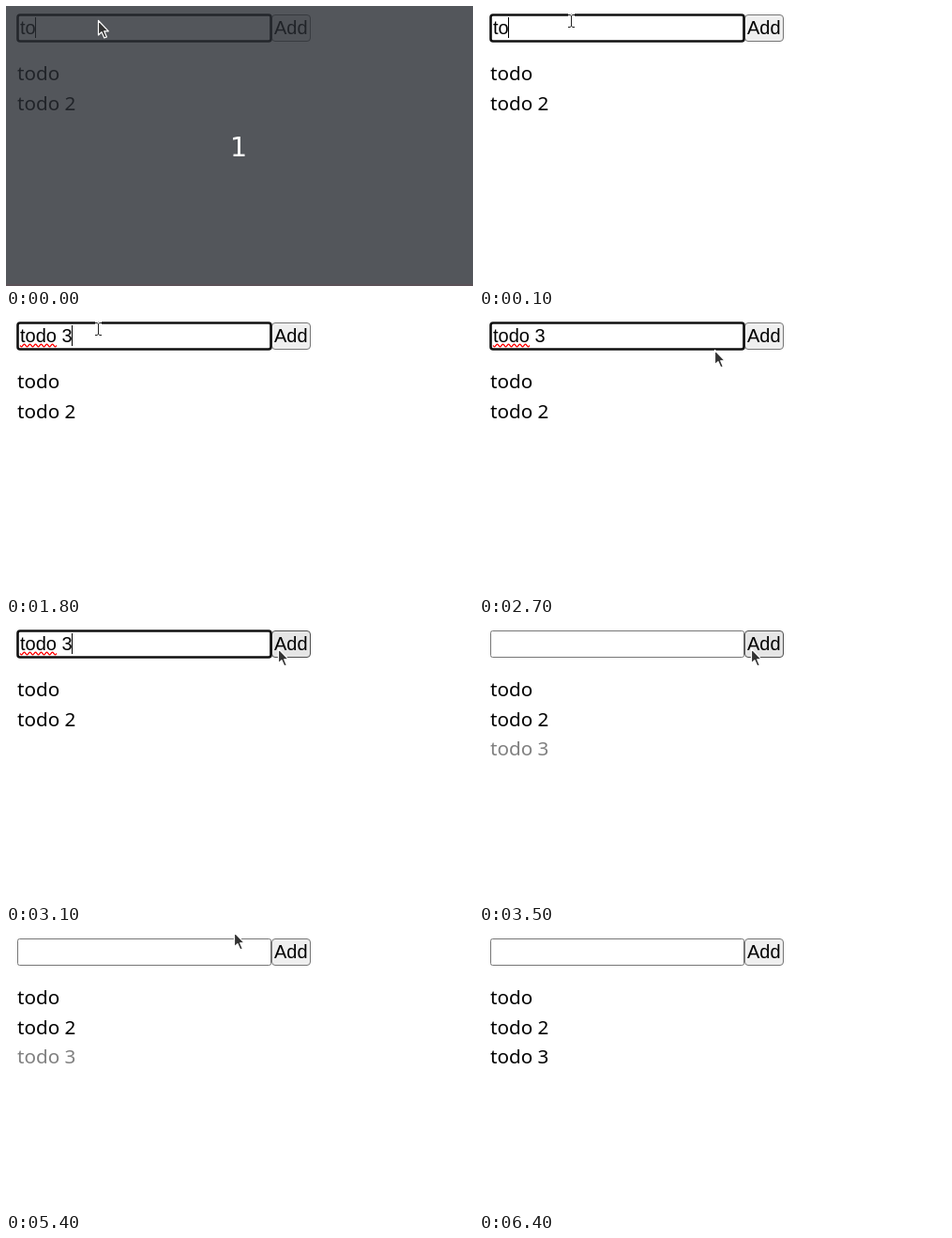
These frames come from a looping animation (498 by 298 pixels, 7800 ms). An HTML page with a canvas:

```html
<!DOCTYPE html>
<html lang="en">
<head>
<meta charset="utf-8">
<title>Todo list</title>
<style>
  html, body { margin: 0; width: 100%; height: 100%; overflow: hidden; background: #fff; }
  canvas { display: block; }
</style>
</head>
<body>
<canvas id="stage" width="498" height="298"></canvas>
<script>
const ctx = document.getElementById('stage').getContext('2d');
const LOOP = 7800;
const FORM_FONT = '20px "Liberation Sans", Arial, sans-serif';
const LIST_FONT = '20.7px "Noto Sans", sans-serif';
const COUNT_FONT = '28.5px "DejaVu Sans", sans-serif';

// Each entry is [start time, value...] and holds until the next one.
const typing = [[0, 'to'], [900, 'tod'], [1100, 'todo'], [1600, 'todo '], [1800, 'todo 3'], [3500, '']];
const caret = [[0, true], [200, false], [800, true], [2400, false], [3000, true], [3300, false]];
const pointer = [
  [0, 98, 15], [2500, 135, 10], [2600, 200, 21], [2700, 251, 38], [2800, 271, 37],
  [2900, 282, 33], [3000, 288, 30], [3100, 290, 28],
  [4700, 282, 28], [4800, 266, 25], [4900, 255, 23],
  [5100, 252, 20], [5200, 249, 15], [5300, 246, 10], [5400, 243, 2], [5500, 240, -40]
];
const at = (steps, t) => steps.findLast(step => step[0] <= t).slice(1);

function text(string, x, y, font, color) {
  ctx.font = font;
  ctx.fillStyle = color;
  ctx.fillText(string, x, y);
}

function box(x, y, w, h, radius, fill, stroke, lineWidth = 1) {
  ctx.beginPath();
  ctx.roundRect(x, y, w, h, radius);
  ctx.fillStyle = fill;
  ctx.fill();
  ctx.strokeStyle = stroke;
  ctx.lineWidth = lineWidth;
  ctx.stroke();
}

function squiggle(from, to, y) {
  ctx.beginPath();
  for (let x = from; x <= to; x += 0.5) ctx.lineTo(x, y + 1.3 * Math.sin((x - from) * Math.PI / 3));
  ctx.strokeStyle = '#f00';
  ctx.lineWidth = 1.3;
  ctx.stroke();
}

function arrow(x, y) {
  const shape = new Path2D('M.5 .5V16L4 12.7L6.8 19L9.4 17.9L6.7 11.8H11.3Z');
  ctx.save();
  ctx.translate(x, y);
  ctx.lineJoin = 'round';
  ctx.fillStyle = '#333';
  ctx.fill(shape);
  ctx.strokeStyle = '#fff';
  ctx.lineWidth = 1.2;
  ctx.stroke(shape);
  ctx.restore();
}

function beam(x, y) {
  const shape = new Path2D('M-3 -6H-1L.5 -5L2 -6H4M.5 -5V6M-3 7H-1L.5 6L2 7H4');
  ctx.save();
  ctx.translate(x, y + 0.5);
  for (const [color, width] of [['#fff', 3], ['#222', 1]]) {
    ctx.strokeStyle = color;
    ctx.lineWidth = width;
    ctx.stroke(shape);
  }
  ctx.restore();
}

function drawForm(t, overInput, overButton) {
  const focused = t < 3300;
  const pressed = t >= 3300 && t < 3500;
  const [face, edge] = pressed ? ['#f5f5f5', '#8d8d8d']
    : overButton ? ['#e5e5e5', '#4f4f4f'] : ['#efefef', '#767676'];
  box(283.5, 9.5, 41, 28, 3.5, face, edge);
  text('Add', 286, 30, FORM_FONT, '#000');

  if (focused) box(12.5, 9.5, 270, 28, 2.5, '#fff', '#101010', 2.6);
  else box(12.5, 9.5, 270, 28, 2, '#fff', overInput ? '#4f4f4f' : '#767676');

  const [value] = at(typing, t);
  text(value, 15, 30, FORM_FONT, '#000');
  if (t >= 1600 && value) squiggle(15, 54, 33.5);
  if (at(caret, t)[0]) ctx.fillRect(Math.floor(15 + ctx.measureText(value).width), 12, 1, 22);
}

function drawList(t) {
  text('todo', 12, 79, LIST_FONT, '#000');
  text('todo 2', 12, 111, LIST_FONT, '#000');
  if (t >= 3500) text('todo 3', 12, 142, LIST_FONT, t < 6400 ? '#808080' : '#000');
}

function drawCountdown() {
  ctx.fillStyle = 'rgba(40, 44, 51, .8)';
  ctx.fillRect(0, 0, 498, 298);
  ctx.fillStyle = '#5b5157';
  ctx.fillRect(0, 296, 498, 2);
  ctx.textAlign = 'center';
  text('1', 248, 160, COUNT_FONT, '#fff');
  ctx.textAlign = 'left';
}

function draw(t) {
  const [x, y] = at(pointer, t);
  const inRow = y >= 9 && y < 38;
  const overInput = inRow && x < 282;
  const overButton = inRow && x >= 282;
  const counting = t < 100;

  ctx.fillStyle = '#fff';
  ctx.fillRect(0, 0, 498, 298);
  drawForm(t, overInput, overButton);
  drawList(t);
  if (counting) drawCountdown();
  if (overInput && !counting) beam(x, y);
  else arrow(x, y);
}

const start = performance.now();
function tick() {
  draw((performance.now() - start) % LOOP);
  requestAnimationFrame(tick);
}
tick();
</script>
</body>
</html>
```
